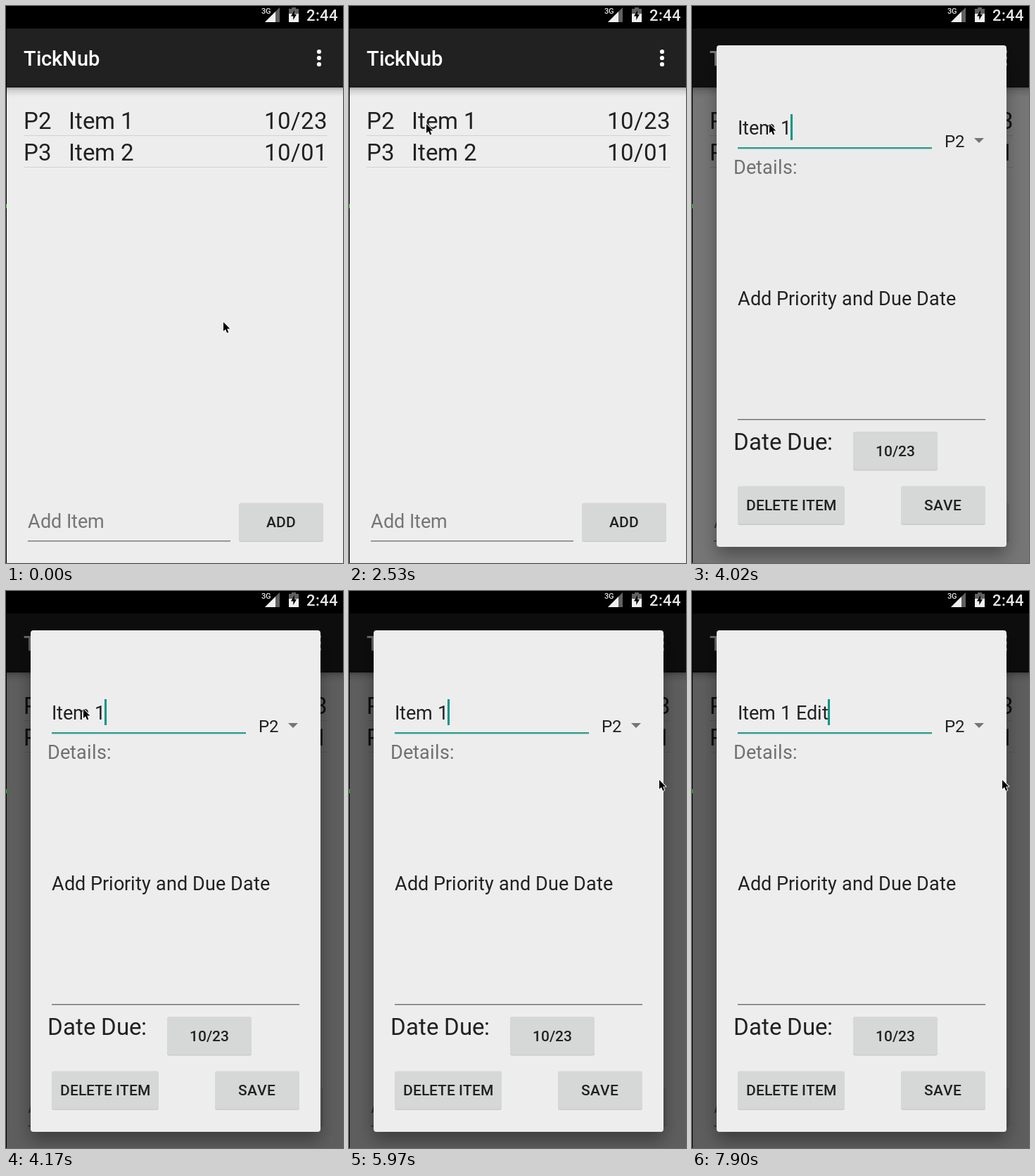
Write an HTML page with a canvas that moves like this. It is 479x793 px and loops after 8000 ms.

```html
<!DOCTYPE html>
<html lang="en">
<head>
<meta charset="utf-8">
<title>Task list</title>
<style>
  html, body { margin: 0; width: 100%; height: 100%; overflow: hidden; background: #000; }
  canvas { display: block; }
</style>
</head>
<body>
<canvas id="stage" width="479" height="793"></canvas>
<script>
const ctx = document.getElementById('stage').getContext('2d');
const LOOP = 8000;
const PRESS = 3880, OPEN = 4020, DIMMED = 4170;
const INK = '#212121', PAGE = '#ededed', GREY = '#757575', TEAL = '#009688';

// [time, x, y] of the pointer tip
const pointerSteps = [
  [0, 309, 450], [1490, 239, 365], [1640, 182, 271], [1940, 169, 229],
  [2080, 167, 203], [2380, 123, 183], [2530, 110, 168],
  [4470, 327, 229], [4620, 441, 269]
];

// [time, field text, caret visible]
const fieldSteps = [
  [OPEN, 'Item 1', true], [4470, 'Item 1', false], [4920, 'Item 1', true],
  [5520, 'Item 1', false], [5970, 'Item 1', true], [6270, 'Item 1 ', true],
  [6720, 'Item 1 ', false], [6860, 'Item 1 E', true], [7010, 'Item 1 Ed', true],
  [7460, 'Item 1 Ed', false], [7760, 'Item 1 Edi', true], [7900, 'Item 1 Edit', true]
];

function stepAt(steps, t) {
  let current = steps[0];
  for (const step of steps) if (step[0] <= t) current = step;
  return current;
}

function rect(x, y, w, h, color) {
  ctx.fillStyle = color;
  ctx.fillRect(x, y, w, h);
}

function roundRect(x, y, w, h, r, color) {
  ctx.fillStyle = color;
  ctx.beginPath();
  ctx.roundRect(x, y, w, h, r);
  ctx.fill();
}

function polygon(points, color) {
  ctx.fillStyle = color;
  ctx.beginPath();
  points.forEach(([x, y]) => ctx.lineTo(x, y));
  ctx.closePath();
  ctx.fill();
}

// The device advances each glyph by whole pixels.
const advance = ch => Math.round(ctx.measureText(ch).width);
const textWidth = s => [...s].reduce((sum, ch) => sum + advance(ch), 0);

function text(s, x, y, size, color = INK, weight = 400, align = 0) {
  ctx.font = `${weight} ${size}px Roboto, sans-serif`;
  ctx.fillStyle = color;
  x -= Math.round(textWidth(s) * align);
  for (const ch of s) {
    ctx.fillText(ch, x, y);
    x += advance(ch);
  }
  return x;
}

function button(label, x, y, w) {
  roundRect(x, y + 1, w, 54.5, 3, 'rgba(0,0,0,.14)');
  roundRect(x, y, w, 54, 3, '#d6d7d7');
  text(label, x + w / 2, y + 34.5, 21, INK, 500, 0.5);
}

function statusBar() {
  rect(0, 0, 479, 32, '#000');
  text('3G', 363, 11, 11, '#e4e4e4', 500);
  polygon([[368, 23], [389, 23], [389, 2]], '#606060');
  polygon([[368, 23], [383, 23], [383, 8]], '#f0f0f0');

  rect(406, 2, 6, 3, '#606060');
  rect(402, 4, 14, 7, '#606060');
  rect(402, 11, 14, 12, '#f0f0f0');
  polygon([[410, 6], [405, 14.5], [408.3, 14.5], [408.3, 20], [413, 11.8], [410, 11.8]], '#000');

  text('2:44', 427, 21, 22, '#e8e8e8', 500);
}

function toolbar() {
  const shade = ctx.createLinearGradient(0, 116, 0, 130);
  shade.addColorStop(0, 'rgba(0,0,0,.28)');
  shade.addColorStop(0.3, 'rgba(0,0,0,.12)');
  shade.addColorStop(0.8, 'rgba(0,0,0,.025)');
  shade.addColorStop(1, 'rgba(0,0,0,0)');
  rect(0, 116, 479, 14, shade);
  rect(0, 32, 479, 84, INK);
  rect(0, 114, 479, 2, '#1b191c');
  text('TickNub', 25, 85, 29, '#fff', 500);
  ctx.fillStyle = '#fff';
  for (const y of [65, 74, 83]) {
    ctx.beginPath();
    ctx.arc(445, y, 3.1, 0, Math.PI * 2);
    ctx.fill();
  }
}

function row(y, priority, name, due) {
  text(priority, 25, y, 33);
  text(name, 89, y, 33);
  text(due, 457, y, 33, INK, 400, 1);
  rect(25, y + 9, 432, 1, '#d2d2d2');
}

function listScreen(pressed) {
  rect(0, 32, 479, 761, PAGE);
  toolbar();
  if (pressed) rect(42, 140, 348, 44, '#dadada');
  row(175, 'P2', 'Item 1', '10/23');
  row(220, 'P3', 'Item 2', '10/01');
  text('Add Item', 31, 743, 27, GREY);
  rect(31, 761, 288, 1.4, '#747474');
  button('ADD', 331, 707.5, 120);
}

function dialog(t) {
  const settled = t >= DIMMED;
  rect(0, 32, 479, 761, `rgba(0,0,0,${settled ? 0.6 : 0.5})`);

  ctx.save();
  ctx.shadowColor = 'rgba(0,0,0,.35)';
  ctx.shadowBlur = 24;
  ctx.shadowOffsetY = 12;
  roundRect(35, 56, 412, 714, 4, settled ? PAGE : '#ebebeb');
  ctx.restore();

  const [, value, caret] = stepAt(fieldSteps, t);
  const end = text(value, 65, 183, 27);
  if (caret) rect(end - 1, 154, 3, 37, TEAL);
  rect(65, 201, 276, 2.4, '#2f9d90');

  text('P2', 359, 201, 24);
  polygon([[401, 188], [415, 188], [408, 195]], GREY);

  text('Details:', 59, 239, 27, '#707070');
  text('Add Priority and Due Date', 65, 426, 27);
  rect(65, 588, 352, 1.4, '#6c6c6c');

  text('Date Due:', 59, 632, 33);
  button('10/23', 229, 606, 120);
  button('DELETE ITEM', 65, 683.5, 152);
  button('SAVE', 297, 683.5, 120);
}

function pointer(x, y) {
  const shape = [[0, 0], [0, 13], [3, 10.3], [5.2, 15.4], [7.4, 14.5], [5.2, 9.4], [9.4, 9.4]]
    .map(([dx, dy]) => [x + dx, y + dy]);
  polygon(shape, '#000');
  ctx.strokeStyle = '#fff';
  ctx.lineWidth = 1.8;
  ctx.lineJoin = 'round';
  ctx.stroke();
  polygon(shape, '#000');
}

function draw(t) {
  listScreen(t >= PRESS);
  if (t >= OPEN) dialog(t);
  statusBar();
  rect(0, 32, 1, 761, '#000');
  rect(0, 282, 1, 6, '#0c0');
  const [, x, y] = stepAt(pointerSteps, t);
  pointer(x, y);
}

const start = performance.now();
function tick() {
  draw((performance.now() - start) % LOOP);
  requestAnimationFrame(tick);
}
tick();
</script>
</body>
</html>
```
